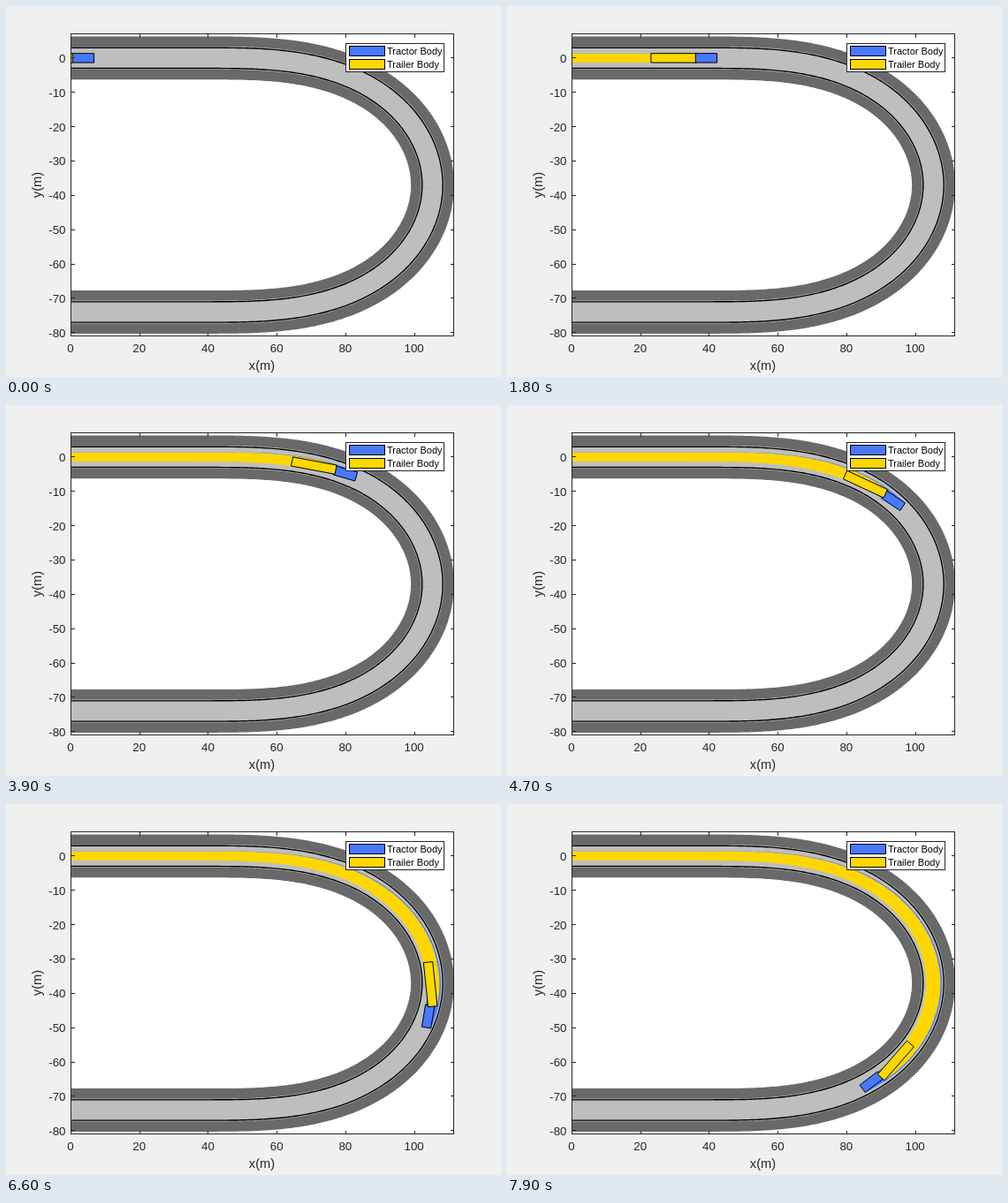
An HTML page that plays this animation: 560x420 px, repeating every 8 s.

```html
<!DOCTYPE html>
<html lang="en">
<head>
<meta charset="utf-8">
<title>Tractor and trailer on a U-turn</title>
<style>
  html, body { margin: 0; width: 100%; height: 100%; overflow: hidden; background: #f0f0f0; }
  svg { display: block; width: 560px; height: 420px; }
  text { font-family: "Liberation Sans", Arial, sans-serif; fill: #262626; }
  .tick { font-size: 13.33px; }
  .label { font-size: 14.67px; text-anchor: middle; }
  .legend text { font-size: 11px; fill: #000; }
  .axis { fill: none; stroke: #262626; shape-rendering: crispEdges; }
  .road { fill: none; }
  .tractor { fill: #4878ff; }
  .trailer { fill: #ffd700; }
  .body { stroke: #000; stroke-linejoin: miter; }
</style>
</head>
<body>
<svg viewBox="0 0 560 420">
  <clipPath id="plot"><rect x="73.5" y="31.5" width="433" height="342"/></clipPath>
  <rect width="560" height="420" fill="#f0f0f0"/>
  <rect x="73.5" y="31.5" width="433" height="342" fill="#fff"/>
  <g clip-path="url(#plot)">
    <path id="shoulder" class="road" stroke="#696969" stroke-width="48.8"/>
    <path id="lane" class="road" stroke="#bebebe" stroke-width="26"/>
    <path id="edges" class="road" stroke="#000" stroke-width="1.4"/>
    <path id="tractorTrail" class="tractor"/>
    <path id="trailerTrail" class="trailer"/>
    <path id="tractor" class="tractor body"/>
    <path id="trailer" class="trailer body"/>
  </g>
  <path id="axis" class="axis"/>
  <g id="ticks"></g>
  <text class="label" x="289.5" y="412">x(m)</text>
  <text class="label" transform="translate(40 202.5) rotate(-90)">y(m)</text>
  <g class="legend">
    <rect x="384.5" y="42.5" width="111" height="32" fill="#fff" stroke="#262626" shape-rendering="crispEdges"/>
    <rect class="tractor body" x="388.5" y="45.5" width="40" height="11" shape-rendering="crispEdges"/>
    <rect class="trailer body" x="388.5" y="60.5" width="40" height="11" shape-rendering="crispEdges"/>
    <text x="431" y="55">Tractor Body</text>
    <text x="431" y="70">Trailer Body</text>
  </g>
</svg>
<script>
const byId = id => document.getElementById(id);
const draw = (id, d) => byId(id).setAttribute('d', d);

// Plot scale in pixels per metre, and the pixel position of the data origin
const SCALE = 3.886, X0 = 73.5, Y0 = 58.9;

// Timing and travel; trails are swept in finer steps than the shown poses
const FRAME_MS = 100, FRAMES = 80, TRAVEL = 69 / 9, SUBSTEPS = 16, TRAIL_STEPS = 4;
const DS = TRAVEL / SUBSTEPS;

// Path: a straight, a clothoid to the apex, its mirror image, a straight
const START_X = 63.3, STRAIGHT = 163.3, CLOTHOID = 328.1;
const PATH_LENGTH = 2 * (STRAIGHT + CLOTHOID);

// Bodies, measured along their axis from the hitch
const HALF_WIDTH = 5.2, TRACTOR = [11, 36.3], TRAILER = [-38.4, 12];
const TRAILER_BASE = 26.5, LEAD = 3;

function heading(s) {
  const t = s - STRAIGHT;
  const v = Math.max(0, CLOTHOID - Math.abs(t - CLOTHOID)) / CLOTHOID;
  const turn = Math.PI / 2 * v * v;
  return t <= CLOTHOID ? turn : Math.PI - turn;
}

// The trailer heading follows the hitch like a towed axle
function buildPoses() {
  const poses = [];
  let x = START_X, y = Y0, towed = 0;
  for (let s = 0; s <= PATH_LENGTH; s += DS) {
    const angle = heading(s);
    poses.push({ x, y, angle, steer: heading(s + LEAD), towed });
    const mid = heading(s + DS / 2);
    x += DS * Math.cos(mid);
    y += DS * Math.sin(mid);
    towed += DS * Math.sin(mid - towed) / TRAILER_BASE;
  }
  return poses;
}

const point = (x, y) => x.toFixed(2) + ' ' + y.toFixed(2);
const polyline = points => 'M' + points.join('L');

function bodyPath({ x, y }, angle, [back, front]) {
  const c = Math.cos(angle), s = Math.sin(angle);
  const corner = (along, side) => point(x + along * c - side * s, y + along * s + side * c);
  return polyline([
    corner(back, -HALF_WIDTH), corner(front, -HALF_WIDTH),
    corner(front, HALF_WIDTH), corner(back, HALF_WIDTH)
  ]) + 'Z';
}

const poses = buildPoses();

function drawRoad() {
  const samples = poses.filter((p, i) => i % 6 === 0 || i === poses.length - 1);
  const offset = d => polyline(samples.map(p =>
    point(p.x - d * Math.sin(p.angle), p.y + d * Math.cos(p.angle))));
  draw('shoulder', offset(0));
  draw('lane', offset(0));
  draw('edges', offset(-3 * SCALE) + offset(3 * SCALE));
}

function drawAxes() {
  let lines = 'M73.5 31.5H506.5V373.5H73.5Z', labels = '';
  const label = (x, y, anchor, value) =>
    labels += `<text class="tick" x="${x}" y="${y}" text-anchor="${anchor}">${value}</text>`;
  const snap = v => Math.floor(v) + 0.5;
  for (let m = 0; m <= 100; m += 20) {
    const x = X0 + m * SCALE;
    lines += `M${snap(x)} 373.5v-4M${snap(x)} 31.5v4`;
    label(x - 0.5, 392, 'middle', m);
  }
  for (let m = 0; m >= -80; m -= 10) {
    const y = Y0 - m * SCALE;
    lines += `M73.5 ${snap(y)}h4M506.5 ${snap(y)}h-4`;
    label(67.5, Math.round(y + 5), 'end', m);
  }
  draw('axis', lines);
  byId('ticks').innerHTML = labels;
}

const stride = SUBSTEPS / TRAIL_STEPS;
const stops = Array.from({ length: FRAMES * TRAIL_STEPS }, (_, i) => poses[i * stride]);
const tractors = stops.map(p => bodyPath(p, p.steer, TRACTOR));
const trailers = stops.map(p => bodyPath(p, p.towed, TRAILER));

let shown = -1;
function render(time) {
  const n = Math.floor(time / FRAME_MS) % FRAMES;
  if (n === shown) return;
  shown = n;
  const now = n * TRAIL_STEPS;
  draw('tractorTrail', tractors.slice(0, now).join(''));
  draw('trailerTrail', trailers.slice(0, now).join(''));
  draw('tractor', tractors[now]);
  draw('trailer', trailers[now]);
}

drawRoad();
drawAxes();
render(0);

const begin = performance.now();
function tick() {
  render(performance.now() - begin);
  requestAnimationFrame(tick);
}
requestAnimationFrame(tick);
</script>
</body>
</html>
```
